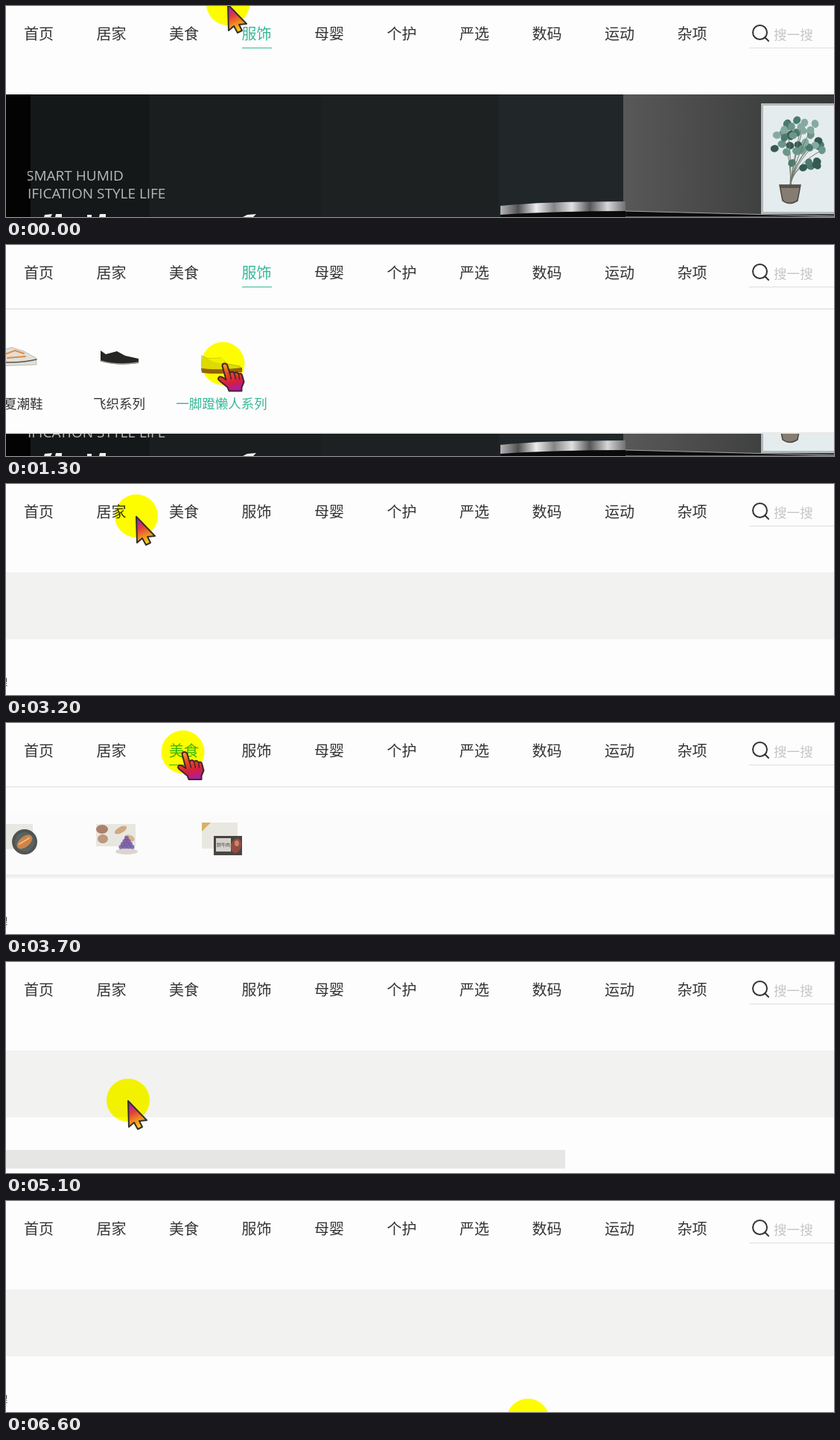
Recreate the animation shown at these times as an HTML page with a canvas. Size 1112 px wide and 284 px high, loop 6700 ms.

```html
<!DOCTYPE html>
<html lang="zh">
<head>
<meta charset="utf-8">
<title>Shop menu</title>
<style>
html, body { margin: 0; width: 1112px; height: 284px; overflow: hidden; background: #fdfdfd; }
canvas { display: block; }
</style>
</head>
<body>
<canvas id="stage" width="1112" height="284"></canvas>
<script>
const c = document.getElementById('stage').getContext('2d');
const W = 1112, H = 284, LOOP = 6700, STEP = 100;
const CJK = '"Noto Sans CJK SC", "Noto Sans CJK", sans-serif';
const PAPER = '#fdfdfd', INK = '#333333', GREEN = '#35b898', RULE = '#e9e9e6';
const NAV = ['首页', '居家', '美食', '服饰', '母婴', '个护', '严选', '数码', '运动', '杂项'];
const LABELS = {
  shoes: ['春夏潮鞋', '飞织系列', '一脚蹬懒人系列'],
  food: ['水产海鲜', '全球美食', '冷冻冷藏']
};
const PANEL_TOP = 87, PANEL_H = 165;

// time, x, y of the pointer
const PATH = [
  [0, 298, -3], [300, 322, 22], [500, 333, 38], [800, 333, 38], [1000, 320, 80],
  [1400, 282, 186], [2600, 282, 186], [2900, 225, 110], [3100, 168, 34],
  [3200, 175, 43], [3300, 190, 41], [3500, 236, 38], [3900, 239, 40],
  [4100, 228, 110], [4300, 164, 186], [5400, 164, 186], [5700, 400, 120],
  [6100, 800, 66], [6300, 787, 190], [6500, 730, 262], [6600, 701, 295]
];
// time, open share of the drop-down
const OPEN = [
  [0, 0], [400, 0], [500, .35], [600, .71], [700, 1], [2000, 1], [2100, .78],
  [2200, .35], [2300, 0], [3500, 0], [3600, .35], [3700, .71], [3800, 1],
  [4800, 1], [4900, .78], [5000, .35], [5100, 0], [6600, 0]
];

function track(keys, t) {
  let i = 1;
  while (i < keys.length - 1 && keys[i][0] < t) i++;
  const a = keys[i - 1], b = keys[i];
  const k = Math.min(1, (t - a[0]) / (b[0] - a[0]));
  return a.slice(1).map((v, n) => v + (b[n + 1] - v) * k);
}

function rect(x, y, w, h, fill) {
  c.fillStyle = fill;
  c.fillRect(x, y, w, h);
}

function text(s, x, y, size, fill, align = 'left', font = CJK, weight = 300) {
  c.font = `${weight} ${size}px ${font}`;
  c.textAlign = align;
  c.fillStyle = fill;
  c.fillText(s, x, y);
}

function shape(d, fill, stroke, width = 1) {
  const p = new Path2D(d);
  if (fill) { c.fillStyle = fill; c.fill(p); }
  if (stroke) { c.strokeStyle = stroke; c.lineWidth = width; c.stroke(p); }
}

function oval(x, y, rx, ry, fill, turn = 0) {
  c.beginPath();
  c.ellipse(x, y, rx, ry, turn, 0, 7);
  c.fillStyle = fill;
  c.fill();
}

function blend(x0, y0, x1, y1, ...colors) {
  const g = c.createLinearGradient(x0, y0, x1, y1);
  colors.forEach((v, i) => g.addColorStop(i / (colors.length - 1), v));
  return g;
}

function seeded(n) {
  return () => (n = n * 16807 % 2147483647) / 2147483647;
}

function plant() {
  rect(1014, 131, 98, 149, '#b4b9bb');
  rect(1017, 134, 95, 143, '#e4ecee');
  const rnd = seeded(77), greens = ['#4b7a6c', '#86aa9f', '#365a50', '#6b978a'];
  c.lineCap = 'round';
  for (let i = 0; i < 46; i++) {
    const a = rnd() * 6.28, r = Math.sqrt(rnd());
    const x = 1066 + Math.cos(a) * r * 34, y = 190 + Math.sin(a) * r * 41;
    if (i % 5 === 0) shape(`M1053 244Q1056 215 ${x} ${y}`, null, '#71796f', 1);
    oval(x, y, 5.5, 4.8, greens[i % 4], rnd() * 3);
  }
  shape('M1039 241H1067L1063 262Q1052 269 1043 262Z', '#857d72', '#4c4741', 1.5);
  rect(1039, 241, 28, 4, '#57514a');
}

function banner() {
  rect(0, 119, W, 165, '#151819');
  rect(0, 119, 33, 165, '#030303');
  rect(193, 119, 231, 165, '#1b1e1f');
  rect(424, 119, 238, 165, '#1e2122');
  rect(662, 119, 167, 165, '#212728');
  rect(829, 119, 283, 165, blend(829, 0, 1112, 0, '#585858', '#4c4c4c', '#3f4040', '#373838'));
  plant();
  const copy = '"Open Sans", sans-serif';
  text('SMART HUMID', 27, 235, 19, '#b9b9b7', 'left', copy, 400);
  text('IFICATION STYLE LIFE', 29, 259, 19, '#b9b9b7', 'left', copy, 400);
  rect(24, 215, 5, 50, '#030303');
  shape('M52 281l10 -1l-2 4h-9ZM67 280h8v4h-9ZM109 281h6v3h-6ZM126 280h8v4h-9ZM318 284l6 -3l12 -1l-4 4Z', '#f1f1ef');
  shape('M832 276L1112 283V284H832Z', '#0a0a0a', '#a3a3a3', 1);
  shape('M664 284V269Q720 263 832 263V284Z', '#0a0a0a');
  shape('M664 269Q720 263 832 263V276Q740 276 664 281Z',
    blend(664, 0, 832, 0, '#b5b5b8', '#515153', '#ededf0', '#848486', '#e0e0e3', '#565658', '#d7d7da', '#707072'));
}

function page(t) {
  rect(0, 0, W, H, PAPER);
  if (t < 2000) return banner();
  rect(0, 119, W, 90, '#f2f2f1');
  const loading = t < 2500 || (t >= 4900 && t < 5300);
  if (loading) rect(0, 253, 751, 25, '#e6e6e5');
  else text('理', 2, 271, 12, INK, 'right');
}

const ITEMS = {
  shoes() {
    shape('M-14 143L8 138L24 143L40 152L41 161L-14 163Z', '#e2dfd8', '#bfbab0', 1);
    shape('M-4 148L12 142L24 146M2 152L26 150', null, '#df8c42', 2);
    shape('M-14 157Q16 160 41 154', null, '#57554f', 1.5);
    shape('M127 142L134 147L149 143L160 149L178 153V159Q150 163 127 156Z', '#262624');
    shape('M127 156Q150 163 178 158', null, '#9d988d', 1.5);
    shape('M263 149L271 153L289 152L297 160L314 163L317 168L263 169Z', '#dedad2', '#c3beb4', 1);
    shape('M271 153L290 152L295 159Q280 160 271 153Z', '#f0efeb');
    shape('M262 166Q288 169 317 165V171Q288 175 263 172Z', '#966457');
  },
  food() {
    rect(-14, 136, 50, 34, '#e6e5df');
    oval(25, 160, 17, 17, '#343a38');
    oval(25, 160, 13, 13, '#596764');
    oval(25, 160, 12, 7, '#e28a45', -.7);
    shape('M18 163L31 155', null, '#f8c78a', 2);
    rect(121, 136, 53, 30, '#e6e3dc');
    oval(129, 143, 8, 6, '#a06e55');
    oval(130, 156, 7, 6, '#b58a6b');
    oval(154, 144, 9, 4, '#cd9c70', -.5);
    oval(166, 155, 7, 4, '#d5ac80', .4);
    for (let r = 0; r < 4; r++)
      for (let i = 0; i <= r; i++) oval(162 + (i - r / 2) * 5, 155 + r * 4, 3, 3, '#7054a0');
    oval(162, 173, 15, 4, '#d2d0c4');
    rect(263, 134, 48, 35, '#e6e4dc');
    shape('M263 134H275L263 146Z', '#d4a750');
    rect(279, 152, 38, 26, '#2c2824');
    rect(282, 155, 20, 18, '#eeece6');
    text('鲜牛肉', 292, 166, 6, '#2c2824', 'center');
    oval(309, 165, 7, 10, '#a34e42', .3);
    oval(310, 162, 3, 4, '#d3906c');
  }
};

function panel(kind, open, hover) {
  if (open <= 0) return;
  const h = Math.round(PANEL_H * open);
  c.save();
  c.globalAlpha = Math.min(1, open * 1.2);
  rect(0, PANEL_TOP - 2, W, 2, RULE);
  rect(0, PANEL_TOP + h, W, 2, RULE);
  c.beginPath();
  c.rect(0, PANEL_TOP, W, h);
  c.clip();
  rect(0, PANEL_TOP, W, h, PAPER);
  ITEMS[kind]();
  LABELS[kind].forEach((s, i) =>
    text(s, 14.5 + i * 137.5, 220, 17.5, i === hover ? GREEN : INK, 'center'));
  c.restore();
}

function header(active) {
  NAV.forEach((s, i) => {
    const x = 24 + i * 97.5;
    text(s, x, 45, 20, i === active ? GREEN : INK);
    if (i === active) rect(Math.round(x), 56, 40, 1, GREEN);
  });
  c.beginPath();
  c.arc(1012.5, 35.5, 9.5, 0, 7);
  c.moveTo(1019, 42);
  c.lineTo(1024, 47);
  c.strokeStyle = INK;
  c.lineWidth = 2;
  c.stroke();
  text('搜一搜', 1031, 45, 17.6, '#c6c6c6');
  rect(998, 56, 114, 1, '#dedede');
}

function pointer(x, y, hand) {
  c.save();
  c.translate(x, y);
  c.globalCompositeOperation = 'multiply';
  oval(0, 0, 29, 29, '#ffff00');
  c.globalCompositeOperation = 'source-over';
  c.lineJoin = 'round';
  if (hand) {
    shape('M-1 3Q-1 0 2 0Q5 0 6 3L9 13Q12 9 15 13Q18 10 21 14Q25 12 26 17L28 25L25 32V37H8L6 32L-5 23Q-8 20 -5 18Q-2 17 4 22Z',
      blend(4, 0, 14, 38, '#f5a623', '#e94a22', '#d61f3c', '#a51cb4'), '#42262a', 2);
    shape('M9 13L11 21M15 13L17 21M21 14L22 21', null, '#42262a', 1.5);
  } else {
    shape('M0 1L1 36L8 30L13 39L19 36L15 28L25 27Z',
      blend(2, 6, 16, 36, '#a524b4', '#e23d3c', '#f08a1e', '#ffd21a'), '#33302c', 2);
  }
  c.restore();
}

function draw(t) {
  const [x, y] = track(PATH, t), [open] = track(OPEN, t);
  const active = t <= 2200 ? 3 : t >= 3500 && t <= 5000 ? 2 : -1;
  const inPanel = open > 0 && y > 110;
  const hover = inPanel ? Math.round((x - 14) / 137.5) : -1;
  const onNav = active >= 0 && y > 20 && y < 60 && Math.abs(x - 44 - active * 97.5) < 21;
  page(t);
  panel(t < 3000 ? 'shoes' : 'food', open, hover);
  header(active);
  pointer(x, y, onNav || (inPanel && open === 1));
}

const start = performance.now();
function tick() {
  const t = (performance.now() - start) % LOOP;
  draw(Math.floor(t / STEP) * STEP);
  requestAnimationFrame(tick);
}
tick();
</script>
</body>
</html>
```
